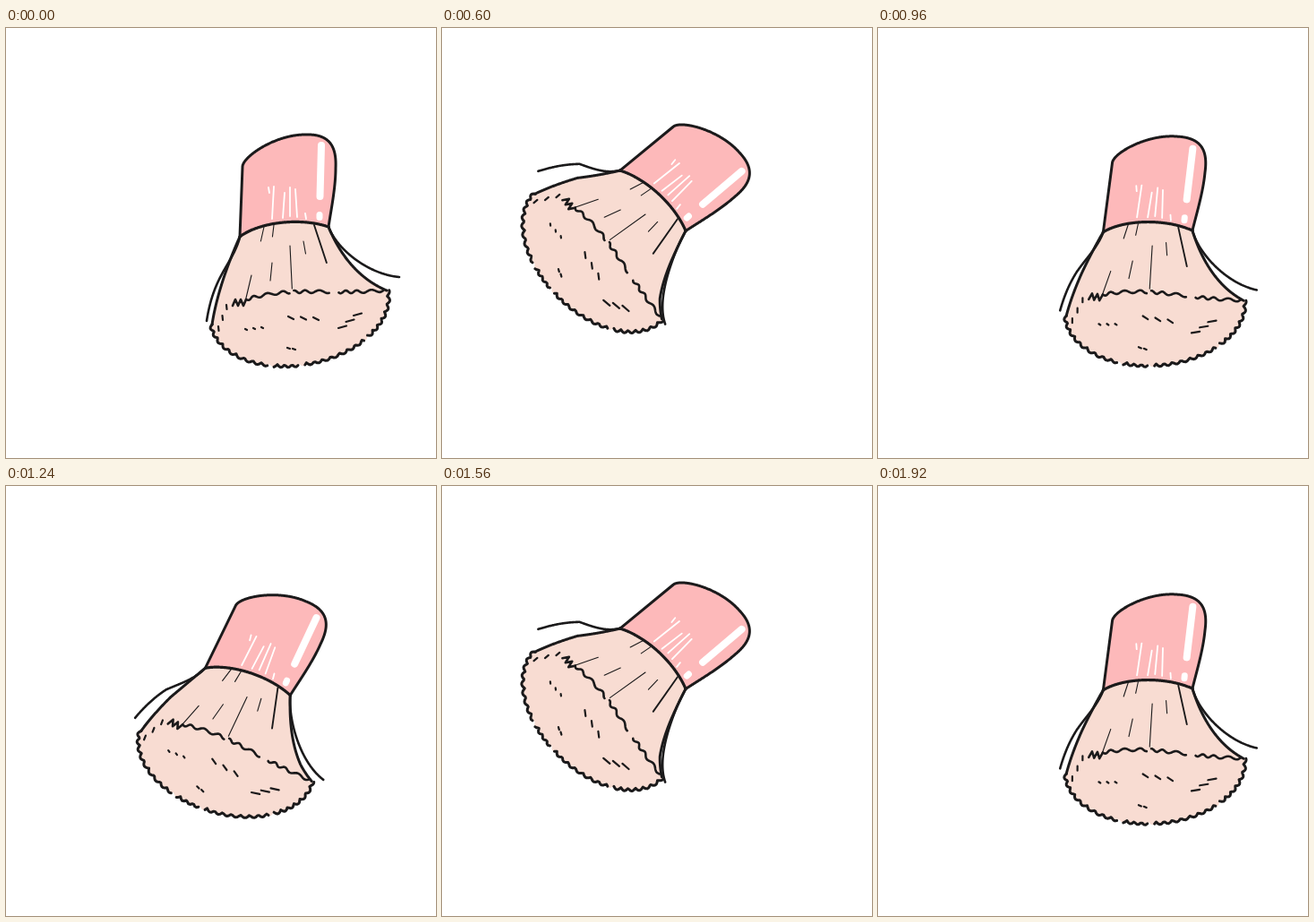
Write an HTML page with a canvas that moves like this. It is 480 by 480 pixels and loops after 1960 ms.

```html
<!DOCTYPE html>
<html lang="en">
<head>
<meta charset="utf-8">
<title>Makeup brush</title>
<style>
html, body { margin: 0; width: 100%; height: 100%; overflow: hidden; background: #fff; }
canvas { display: block; width: 480px; height: 480px; }
</style>
</head>
<body>
<canvas id="stage" width="480" height="480"></canvas>
<script>
const ctx = document.getElementById('stage').getContext('2d');
const INK = '#1b1a1b', PINK = '#fdb9ba', SKIN = '#f8dcd2', WHITE = '#fff';
const LOOP = 1960, STEP = 40;
const PIVOT = [311, 126], NECK = [310.5, 227.5], BEND = 0.155, STRAY_BEND = 0.32;

const range = (n, f) => Array.from({ length: n }, (_, i) => f(i));
const sample = f => range(161, i => f(i / 160));
const part = (pts, from, to) => pts.slice(from * pts.length, to * pts.length);
const line = (x, y, dx, dy) => [[x, y], [x + dx, y + dy]];

function bezier(a, b, c, d) {
  return sample(u => {
    const v = 1 - u;
    return [0, 1].map(j =>
      v * v * v * a[j] + 3 * v * v * u * b[j] + 3 * v * u * u * c[j] + u * u * u * d[j]);
  });
}

function turn([x, y], [cx, cy], deg) {
  const a = deg * Math.PI / 180, c = Math.cos(a), s = Math.sin(a);
  return [cx + (x - cx) * c - (y - cy) * s, cy + (x - cx) * s + (y - cy) * c];
}

// Push a curve along its normal with a wave of the arc length
function ruffle(pts, wave) {
  let s = 0;
  return pts.map(([x, y], i) => {
    const p = pts[Math.max(0, i - 1)], q = pts[Math.min(pts.length - 1, i + 1)];
    const dx = q[0] - p[0], dy = q[1] - p[1], len = Math.hypot(dx, dy);
    s += Math.hypot(x - p[0], y - p[1]);
    const w = wave(s);
    return [x - dy / len * w, y + dx / len * w];
  });
}
const scallop = s => 3.2 * Math.abs(Math.sin(Math.PI * s / 9 + 0.7 * Math.sin(s / 17)));
const ripple = s => 1.6 * Math.sin(s / 2.3 + Math.sin(s / 9));

const handle = [
  [261, 233],
  ...bezier([264, 155], [264, 144], [300, 119], [334, 119]),
  ...bezier([334, 119], [362, 118], [369, 133], [368, 156]),
  ...bezier([368, 156], [368, 178], [363, 202], [360, 222])
];
const ferrule = bezier([360, 222], [328, 211], [282, 217], [261, 233]);
const leftEdge = bezier([261, 233], [248, 262], [235, 298], [230, 331]);
const rightEdge = bezier([425, 293], [396, 281], [374, 256], [360, 222]);
const strays = [
  bezier([261, 234], [252, 265], [232, 275], [224, 327]),
  bezier([360, 222], [370, 248], [405, 275], [439, 278])
];

// The lower rim is half of a tilted ellipse
const middle = [327.5, 312];
const hem = ruffle(sample(u => turn(
  [middle[0] - 99 * Math.cos(Math.PI * u), middle[1] + 62 * Math.sin(Math.PI * u)],
  middle, -10.9)), scallop);
const hemInk = [[0, 0.35], [0.37, 0.46], [0.48, 0.725], [0.745, 1]].map(g => part(hem, ...g));
const rim = ruffle(bezier([268, 303], [320, 288], [350, 298], [421, 293]), ripple);
const rimInk = [[0, 0.35], [0.38, 0.67], [0.73, 1]].map(g => part(rim, ...g));
const tuft = range(6, i => [253 + 3 * i, i % 2 ? 303 : 310]);

// Rows of equal dashes
const row = (n, x, y, stepX, stepY, dx, dy) =>
  range(n, i => line(x + i * stepX, y + i * stepY, dx, dy));
const dashes = [
  ...row(3, 246, 309, -4.5, 12, 0.5, 5),
  ...row(3, 267, 336, 9, -1, 2, 1),
  ...row(3, 315, 322, 14, 0.5, 6, 3),
  ...row(3, 388, 321, -8.5, 7, 9, -2.5),
  ...row(2, 314, 357, 6, 1, 3, 1)
];

// Hairs fan out from a point inside the handle
const hair = (x, y, drop) => line(x, y, drop * (x - 311) / (y - 120), drop);
const hairs = [hair(288, 222, 16), hair(299, 220, 13), hair(274, 276, 27),
  hair(297, 262, 20), hair(317, 243, 48), hair(332, 238, 14)];
const thickHair = hair(344, 220, 42);

const glints = [line(293, 178, 1, 6), line(299, 177, -2, 36), line(311, 184, -2, 28),
  line(317, 178, 0, 32), line(323, 180, 2, 31), line(334, 207, 1, 6)];

let tilt = 0;

// Bend away from the neck, then swing the whole brush
function pose(p, bend) {
  const reach = Math.max(0, Math.min(1, (p[1] - 222) / 60));
  return turn(turn(p, NECK, tilt * bend * reach), PIVOT, tilt);
}
function trace(pts, bend = BEND) {
  ctx.beginPath();
  for (const p of pts) ctx.lineTo(...pose(p, bend));
}
function ink(pts, width, color = INK, bend = BEND) {
  trace(pts, bend);
  ctx.strokeStyle = color;
  ctx.lineWidth = width;
  ctx.stroke();
}
function paint(pts, color) {
  trace(pts);
  ctx.fillStyle = color;
  ctx.fill();
}

// Degrees away from the most upright pose
function swing(t) {
  return t < 540
    ? 25 - 25 * Math.cos(Math.PI * (t / 540) ** 1.11)
    : 26.75 - 23.25 * Math.cos(2 * Math.PI * (t - 1020) / 960);
}

function draw(t) {
  tilt = swing(t);
  ctx.fillStyle = WHITE;
  ctx.fillRect(0, 0, 480, 480);

  paint([...leftEdge, ...hem, ...rightEdge, ...ferrule], SKIN);
  strays.forEach(p => ink(p, 2.6, INK, STRAY_BEND));
  [leftEdge, rightEdge, ...hemInk].forEach(p => ink(p, 3));
  [tuft, ...rimInk].forEach(p => ink(p, 2.6));
  dashes.forEach(p => ink(p, 2.2));
  hairs.forEach(p => ink(p, 1.1));
  ink(thickHair, 1.9);

  paint([...handle, ...ferrule], PINK);
  glints.forEach(p => ink(p, 1.8, WHITE));
  ink(line(352, 131, -1.5, 57), 8, WHITE);
  ink(line(350, 208.5, 0, 3), 7, WHITE);
  ink(handle, 3);
  ink(ferrule, 3.2);
}

ctx.lineCap = ctx.lineJoin = 'round';
const start = performance.now();
function frame() {
  const t = (performance.now() - start) % LOOP;
  draw(Math.floor(t / STEP) * STEP);
  requestAnimationFrame(frame);
}
frame();
</script>
</body>
</html>
```
